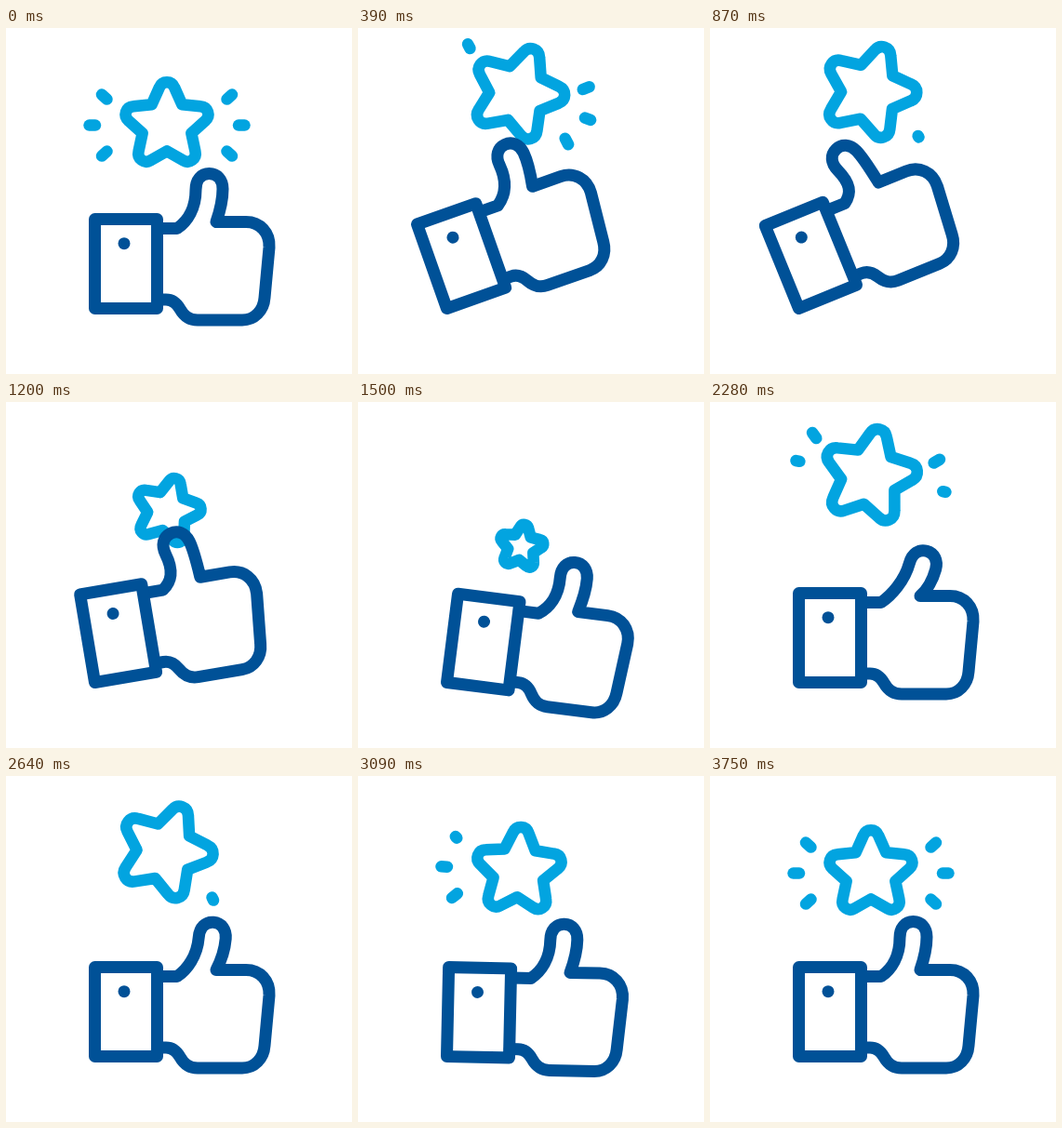
An HTML page that plays this animation: 372 by 372 pixels, repeating every 4230 ms.

```html
<!DOCTYPE html>
<html lang="en">
<head>
<meta charset="utf-8">
<title>Thumbs up</title>
<style>
  html, body { margin: 0; width: 100%; height: 100%; overflow: hidden; background: #fff; }
  svg { display: block; width: 100vw; height: 100vh; }
  path, rect { fill: none; stroke-width: 13; stroke-linecap: round; stroke-linejoin: round; }
  #star path { stroke: #02a4e0; stroke-width: 12.5; }
  #hand path, #hand rect { stroke: #005197; }
  #hand circle { fill: #005197; }
</style>
</head>
<body>
<svg viewBox="0 0 372 372">
  <g id="star">
    <path id="outline"/>
    <g id="rays"></g>
  </g>
  <g id="hand">
    <path id="palm"/>
    <rect x="95.5" y="205.5" width="67" height="96"/>
    <circle cx="127" cy="231.7" r="6.5"/>
  </g>
</svg>
<script>
const LOOP = 4230, STEP = 30, LAST = 3750, RAYS = 6;
const $ = id => document.getElementById(id);
const clamp = v => Math.min(1, Math.max(0, v));
const ramp = (t, a, b) => clamp((t - a) / (b - a));
const ease = (t, a, b) => { const u = ramp(t, a, b); return u * u * (3 - 2 * u); };
// Eases 0 to 1 over a..b, holds until c, eases back to 0 by d.
const pulse = (t, a, b, c, d) => ease(t, a, b) - ease(t, c, d);

function spin([x, y], deg, cx = 0, cy = 0) {
  const a = deg * Math.PI / 180, c = Math.cos(a), s = Math.sin(a);
  return [cx + (x - cx) * c - (y - cy) * s, cy + (x - cx) * s + (y - cy) * c];
}
const text = p => p.map(v => v.toFixed(2)).join(",");

// Rays fan out clockwise from the lower left; each runs from outer to inner end.
const diagonal = (sx, sy) => [[70 * sx, 33 * sy], [64.5 * sx, 28 * sy]];
const level = sx => [[83.5 * sx, 0], [77 * sx, 0]];
const rays = [diagonal(-1, 1), level(-1), diagonal(-1, -1),
  diagonal(1, -1), level(1), diagonal(1, 1)].map(ends => {
  const el = document.createElementNS("http://www.w3.org/2000/svg", "path");
  $("rays").append(el);
  return { el, ends };
});

function starPath(size) {
  let d = "";
  for (let i = 0; i < 5; i++) {
    const at = (x, y) => text(spin([x * size, y * size], i * 72));
    d += `${i ? "L" : "M"}${at(-16.3, -22.4)}L${at(-8.2, -40.5)}`
      + `C${at(-5, -48.2)} ${at(5, -48.2)} ${at(8.2, -40.5)}`;
  }
  return d + "Z";
}

// Only the thumb's upper points turn with the lean; the palm stays put.
function palmPath(lean) {
  const r = (x, y) => text(spin([x, y], lean, 212, 212));
  return `M163,215.5H184C195,208 ${r(204, 194)} ${r(204, 174)}`
    + `C${r(204, 163)} ${r(210, 156.5)} ${r(218.5, 156.5)}`
    + `C${r(227, 156.5)} ${r(233, 163)} ${r(233, 173)}`
    + `C${r(233, 184)} ${r(230, 197)} 226,208.5`
    + "H258C273,208.5 284,220 283,236L278,290C277,304 267,314 254,314"
    + "H206C196,314 191,309 187,302C183,295 178,292 172,292H163";
}

function drawHand(t) {
  const turn = -22.2 * pulse(t, 0, 500, 950, 1500)
    + 7.2 * pulse(t, 950, 1500, 1620, 1980)
    + 2.3 * pulse(t, 2640, 2950, 2950, 3250);
  const lean = -22 * pulse(t, 150, 870, 1000, 1640)
    + 20 * pulse(t, 1500, 1980, 1980, 2950);
  $("hand").setAttribute("transform", `rotate(${turn} 95.5 301.5)`);
  $("palm").setAttribute("d", palmPath(lean));
}

function drawStar(t) {
  const toss = pulse(t, 0, 450, 850, 1500);
  const drop = pulse(t, 850, 1500, 1500, 2100);
  const float = pulse(t, 1700, 2430, 2430, 3240);
  const x = 173 - 1.5 * toss + 2.5 * pulse(t, 850, 1500, 1980, 2400) - 2 * float;
  const y = 104.6 - 36 * toss + 51 * drop - 28 * float;
  const size = 1 + 0.1 * toss - 0.48 * drop + 0.11 * pulse(t, 1500, 2000, 2640, 3240);
  const turn = 20 * pulse(t, 0, 400, 600, 2300) + 21 * pulse(t, 1900, 2600, 2640, 3240);
  $("star").setAttribute("transform", `translate(${x} ${y}) rotate(${turn})`);
  $("outline").setAttribute("d", starPath(size));
}

// One sweep draws the rays in order, a second sweep wipes them in the same order.
function drawRays(t) {
  const drawn = RAYS * (1 + ramp(t, 1740, 2460) + ramp(t, 2690, 3740));
  const wiped = RAYS * (ramp(t, 75, 900) + ramp(t, 2160, 2680));
  const base = RAYS * Math.floor(wiped / RAYS);
  rays.forEach(({ el, ends: [p, q] }, i) => {
    const a = clamp(wiped - base - i), b = clamp(drawn - base - i);
    const at = u => text([p[0] + (q[0] - p[0]) * u, p[1] + (q[1] - p[1]) * u]);
    el.setAttribute("d", b > a ? `M${at(a)}L${at(b)}` : "");
  });
}

const start = performance.now();
function tick() {
  const clock = (performance.now() - start) % LOOP;
  const t = Math.min(LAST, Math.floor(clock / STEP) * STEP);
  drawHand(t);
  drawStar(t);
  drawRays(t);
  requestAnimationFrame(tick);
}
tick();
</script>
</body>
</html>
```
